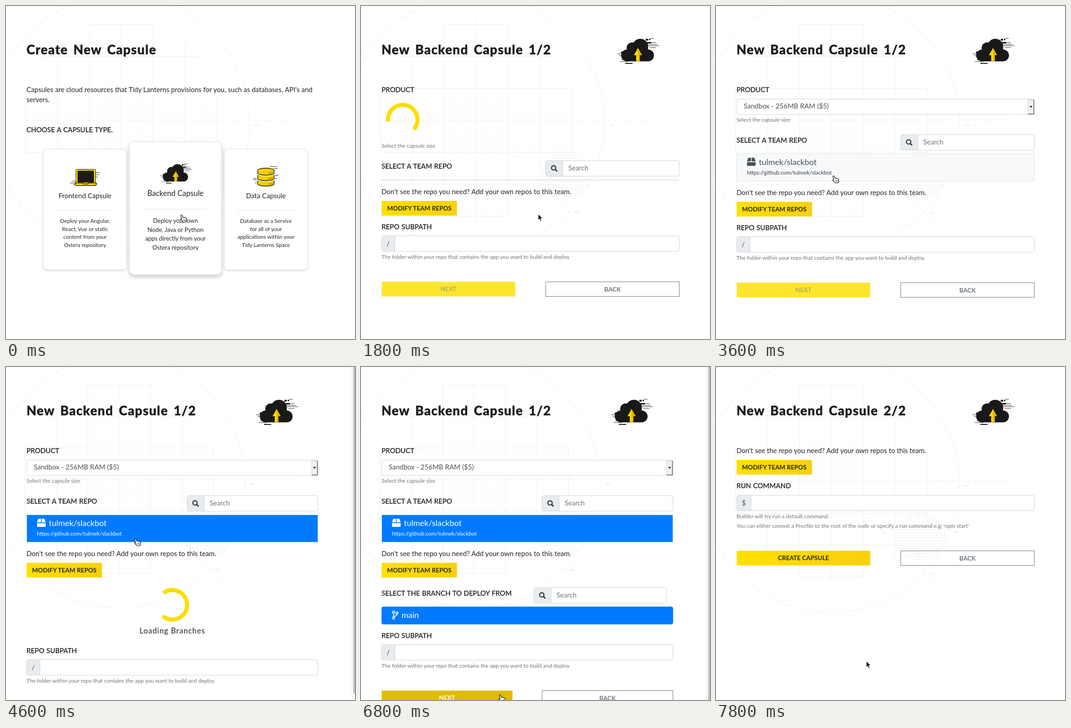
Animation, 766 px wide and 731 px high, one loop 8000 ms. Source, as an HTML page:

```html
<!DOCTYPE html>
<html lang="en">
<head>
<meta charset="utf-8">
<title>New capsule</title>
<style>
html, body { margin: 0; width: 100%; height: 100%; overflow: hidden; background: #fff; }
svg { display: block; }
text { font-family: Lato, "Open Sans", sans-serif; font-size: 15px; fill: #212529; word-spacing: .15px; white-space: pre; }
.label { font-weight: 500; stroke: #212529; stroke-width: .25px; word-spacing: .75px; }
.title { font-size: 28px; font-weight: 800; letter-spacing: 1.3px; word-spacing: 4px; fill: #1b1d20; stroke: #1b1d20; stroke-width: .5px; }
.small { font-size: 12px; word-spacing: 0; }
.hint { font-size: 12px; word-spacing: 0; fill: #6c757d; }
.grey { fill: #6c757d; }
.dark { fill: #495057; }
.btn { font-size: 13.5px; font-weight: 700; text-anchor: middle; }
.repo { font-size: 18px; word-spacing: 0; }
.load { font-size: 17px; letter-spacing: .8px; text-anchor: middle; }
.mid { text-anchor: middle; }
</style>
</head>
<body>
<svg width="766" height="731" viewBox="0 0 766 731">
<defs>
  <pattern id="fine" width="5" height="5" patternUnits="userSpaceOnUse"><circle cx="2" cy="2" r=".5" fill="#eef2f2"/></pattern>
  <pattern id="dots" width="6" height="6" patternUnits="userSpaceOnUse"><circle cx="3" cy="3" r=".75" fill="#c4c8ca"/></pattern>
  <linearGradient id="gold"><stop stop-color="#ffdf00"/><stop offset="1" stop-color="#fad00c"/></linearGradient>
  <filter id="flat" x="-20%" y="-20%" width="140%" height="140%">
    <feDropShadow dx="0" dy="1.5" stdDeviation="2" flood-opacity=".17"/>
  </filter>
  <filter id="lifted" x="-20%" y="-20%" width="140%" height="140%">
    <feDropShadow dx="0" dy="4" stdDeviation="4" flood-opacity=".22"/>
  </filter>
</defs>
<g id="stage"></g>
</svg>
<script>
const stage = document.getElementById('stage');
const YELLOW = '#ffdc00', BLUE = '#007bff', BLACK = '#191919', BORDER = '#ced4da';
const USER = 'tulmek';

const text = (x, y, s, cls = '', fill = '') =>
  `<text x="${x}" y="${y}" class="${cls}" ${fill && `style="fill:${fill}"`}>${s}</text>`;
const rect = (x, y, w, h, fill, stroke = 'none', r = 0) =>
  `<rect x="${x}" y="${y}" width="${w}" height="${h}" fill="${fill}" stroke="${stroke}" rx="${r}"/>`;
const path = (d, fill, stroke = 'none', width = 1) =>
  `<path d="${d}" fill="${fill}" stroke="${stroke}" stroke-width="${width}"/>`;
const circle = (x, y, r, fill, stroke = 'none', width = 1) =>
  `<circle cx="${x}" cy="${y}" r="${r}" fill="${fill}" stroke="${stroke}" stroke-width="${width}"/>`;
const group = (x, y, s, body) => `<g transform="translate(${x} ${y}) scale(${s})">${body}</g>`;

// Backdrop
const tag = (x, y) => `<text x="${x}" y="${y}" style="font-size:7px;fill:#c3c8ca" class="mid">&lt;/&gt;</text>`;
const backdrop =
  '<circle cx="252" cy="257" r="282" fill="none" stroke="#e8ecec" stroke-dasharray="14 9"/>' +
  rect(183, 40.5, 140, 421, 'url(#fine)', '#eaf0f0') +
  rect(42.5, 181, 421, 140, 'url(#fine)', '#eaf0f0') +
  path('M252.5 30V473M113 80V420M393 80V420M33 250.5H470M82 110.5H423M82 391H423', 'none', '#edf2f2') +
  '<path d="M470 250.5H650M300 295L484 481" fill="none" stroke="#e6eaea" stroke-dasharray="7 5"/>' +
  circle(451, 372, 54, 'url(#dots)') +
  tag(550, 264) + tag(472, 456) + tag(528, 364);

// Icons, each around its own centre
const cloud =
  circle(-23, 11.5, 13, BLACK) + circle(-12, -5, 12, BLACK) + circle(6, -7.5, 17.5, BLACK) +
  circle(23, 11.5, 13, BLACK) + rect(-23, -5, 46, 29.5, BLACK, 'none', 3) +
  path('M18-25h5v4h-5zM25-25h3v3h-3zM21-18h9v3h-9zM-27 28h16v2h-16zM-36 3h10v4h-10z', BLACK) +
  path('M20-17H40M24-10H48M22-13H43M27-6H40M-44 8H-30M-41 12H-28M-39 25H-20M-37 5H-28M-35 21H-22M28-26H36', 'none', BLACK, .9) +
  path('M1-5L-8 11H-3V24H1Z', YELLOW) + path('M1-5L10 11H5V24H1Z', '#e2b600');

const laptop =
  path('M-29 9H-18M-34 13H-20M-27 17H-20M22-10H32M20-5H30M22 0H27', 'none', BLACK, .9) +
  rect(-21, -17, 43, 32, YELLOW, '#111', 2) +
  rect(-17, -13.5, 35, 25, '#1c1c1c', '#111', 1) +
  path('M-23 13H-6L-4 15H5L7 13H24V16Q23 18.5 20 18.5H-19Q-22 18.5-23 16Z', YELLOW, '#111', 1.4);

const disc = y => {
  const d = `M-18 ${y}a18 4.5 0 0 1 36 0v6a18 5 0 0 1-36 0z`;
  return path(d, '#fff', '#fff', 4.5) + path(d, '#f3cf00', '#111', 1.4) +
    path(`M4 ${y + 4.4}Q14 ${y + 3.5} 17.3 ${y + 1}V${y + 6}Q13 ${y + 9.5} 4 ${y + 10.2}Z`, '#d6ab00');
};
const database =
  path('M8-24H25M16-20H26M-29 2H-18M-27 5H-20M-24 12H-19M20-5H28M19 2H24', 'none', BLACK, .9) +
  [8, -4, -16].map(disc).join('');

const lens = (x, y) => circle(x - 1.2, y - 1.2, 4.8, 'none', '#343a40', 2.4) +
  path(`M${x + 2.6} ${y + 2.6}L${x + 6.4} ${y + 6.4}`, 'none', '#343a40', 3);
const parcel = (y, fill) =>
  group(68, y, 1, path('M4 0H8.7V8H0L2.4 1.2Q2.8 0 4 0ZM10.3 0H15Q16.2 0 16.6 1.2L19 8H10.3ZM0 9.7H19V16Q19 18 17 18H2Q0 18 0 16Z', fill));
const fork = (y, c) => path(`M71.5 ${y - 4}V${y + 4}M79 ${y - 2}Q79 ${y + 2} 72 ${y + 3}`, 'none', c, 1.8) +
  [[71.5, -6.5], [71.5, 6.5], [79, -4.5]].map(([x, dy]) => circle(x, y + dy, 2.3, 'none', c, 1.8)).join('');

// Form parts
const input = (x, y, w, addon, sign) =>
  rect(x + .5, y + .5, w - 1, 34, '#fff', BORDER, 3.5) +
  path(`M${x + addon} ${y + 1}H${x + 4}Q${x + 1} ${y + 1} ${x + 1} ${y + 4}V${y + 31}Q${x + 1} ${y + 34} ${x + 4} ${y + 34}H${x + addon}Z`, '#e9ecef') +
  path(`M${x + addon} ${y}V${y + 34}`, 'none', BORDER) +
  (sign ? text(x + addon / 2, y + 22.5, sign, 'mid dark') : '');
const search = (x, y, w) => input(x, y, w, 38) + lens(x + 19, y + 17.5) + text(x + 50, y + 22, 'Search', 'grey');
const button = (x, y, w, s, fill, color) =>
  rect(x + .4, y + .4, w - .8, 32.2, fill) + text(x + w / 2, y + 21, s, 'btn', color);
const backButton = (x, y, w) =>
  rect(x + .5, y + .5, w - 1, 32, 'none', '#6c757d') + text(x + w / 2, y + 21.5, 'BACK', 'btn grey');
const addRepos = y => text(45, y, "Don't see the repo you need? Add your own repos to this team.") +
  button(45, y + 14.5, 166, 'MODIFY TEAM REPOS', 'url(#gold)', '#212529');
const spinner = (x, y, start, sweep) => {
  const at = deg => {
    const a = deg * Math.PI / 180;
    return `${x + 32.5 * Math.cos(a)} ${y + 32.5 * Math.sin(a)}`;
  };
  return path(`M${at(start)}A32.5 32.5 0 ${sweep > 180 ? 1 : 0} 1 ${at(start + sweep)}`, 'none', YELLOW, 9);
};

// Pages
const card = (x, y, s, icon, name, lines) => group(x, y, s,
  `<g filter="url(#${s > 1 ? 'lifted' : 'flat'})">${rect(-91.5, -132.5, 183, 265, '#fff', '#dde1e4', 8)}</g>` +
  icon + text(0, -25, name, 'mid') + path('M-62 2H62', 'none', '#dcdfe2') +
  lines.map((l, i) => text(0, 29.3 + 17.7 * i, l, 'mid small')).join(''));

const choosePage = () => backdrop +
  text(45, 106, 'Create New Capsule', 'title') +
  text(45, 189, "Capsules are cloud resources that Tidy Lanterns provisions for you, such as databases, API's and") +
  text(45, 211, 'servers.') +
  text(45, 277, 'CHOOSE A CAPSULE TYPE.', 'label') +
  card(173.5, 446.5, 1, group(1, -71, 1, laptop), 'Frontend Capsule',
    ['Deploy your Angular,', 'React, Vue or static', 'content from your', 'Ostera repository']) +
  card(570.5, 446.5, 1, group(0, -70, 1, database), 'Data Capsule',
    ['Database as a Service', 'for all of your', 'applications within your', 'Tidy Lanterns Space']) +
  card(372, 444, 1.1, group(0, -70.5, .7, cloud), 'Backend Capsule',
    ['Deploy your own', 'Node, Java or Python', 'apps directly from your', 'Ostera repository']);

function formPage(t) {
  const repos = t >= 2000, ready = t >= 3000, hover = t >= 3600, picked = t >= 3800;
  const branches = t >= 4800, chosen = t >= 5600, onNext = t >= 6600;
  const right = picked ? 685 : 699, half = picked ? 288 : 294, col = right - half, wide = right - 45;
  const top = ready ? 0 : 57, mid = top - (repos ? 0 : 59);
  const low = mid + (branches ? 103 : picked ? 136 : 0);
  let s = group(0, 0, picked ? .9825 : 1, backdrop) +
    text(45, 106, 'New Backend Capsule 1/2', 'title') +
    group(picked ? 593 : 607, 97, 1, cloud) + text(45, 189, 'PRODUCT', 'label');

  if (ready) {
    const x = right - 14;
    s += rect(45.5, 204.5, wide - 1, 33.5, '#fff', BORDER, 3.5) +
      text(61, 225, 'Sandbox - 256MB RAM ($5)', 'dark') +
      rect(x, 205.5, 13, 32, '#f1f2f3', '#c9cccf') +
      path(`M${x} 237H${right - 1.5}V206`, 'none', '#7d8286', 2) +
      path(`M${x + 3} 219.5h6.5l-3.2 3.8z`, '#111');
  } else {
    s += spinner(91.5, 249.5, -131 + (t - 1200) * 811 / 1600, 251 - 60 * Math.cos((t - 1200) * Math.PI / 1600));
  }

  s += text(45, 254 + top, 'Select the capsule size', 'hint') +
    text(45, 300 + top, 'SELECT A TEAM REPO', 'label') + search(col, 282 + top, half);

  if (repos) {
    const y = 324 + top, ink = picked ? '#fff' : '';
    s += rect(45.5, y + .5, wide - 1, 60, picked ? BLUE : hover ? '#f8f9fa' : '#fff', picked ? '#cfe3fb' : '#dfe2e5') +
      parcel(y + 9, ink || '#495057') +
      text(94, y + 25, USER + '/slackbot', 'repo dark', ink) +
      text(68, y + 46, `https://github.com/${USER}/slackbot`, 'small', ink || '#343a40');
  } else {
    s += rect(45, 324 + top, wide, 2, '#dee2e6');
  }
  s += addRepos(415 + mid);

  if (branches) {
    const ink = chosen ? '#fff' : '#495057';
    s += text(45, 502, 'SELECT THE BRANCH TO DEPLOY FROM', 'label') + search(379, 484, 292) +
      rect(45.5, 526.5, wide - 1, 38, chosen ? BLUE : '#fff', chosen ? BLUE : '#dfe2e5', 3.5) +
      fork(544.5, ink) + text(89, 551, 'main', 'repo', ink);
  } else if (picked) {
    s += spinner(365, 522, -127 + (t - 4600) * .507, 257 + 60 * Math.sin((t - 4600) * Math.PI / 1600)) +
      text(365, 585, 'Loading Branches', 'load');
  }

  s += text(45, 492 + low, 'REPO SUBPATH', 'label') + input(45, 506 + low, wide, 29.5, '/') +
    text(45, 557 + low, 'The folder within your repo that contains the app you want to build and deploy', 'hint') +
    button(45, 607 + low, half, 'NEXT', onNext ? '#dfbc00' : chosen ? YELLOW : '#fee62c',
      onNext ? '#fff' : chosen ? '#212529' : '#b5ab5c') +
    backButton(col, 607 + low, half);

  if (picked) {
    s += path('M759.5 0V731', 'none', '#e6e6e6') + rect(762, -8, 8, branches ? 760 : 725, '#c1c1c1', 'none', 4);
  }
  return s;
}

const runPage = () => backdrop +
  text(45, 106, 'New Backend Capsule 2/2', 'title') + group(607, 97, 1, cloud) +
  addRepos(189) + text(45, 266, 'RUN COMMAND', 'label') + input(45, 281, 654, 32, '$') +
  text(45, 332, 'Builder will try run a default command.', 'hint') +
  text(45, 353, "You can either commit a Procfile to the root of the code or specify a run command e.g: 'npm start'", 'hint') +
  button(45, 403, 294, 'CREATE CAPSULE', 'url(#gold)', '#212529') + backButton(405, 403, 294);

// Pointer
const arrow = path('M0 0V13L3 10.3L5.2 15.2L7.4 14.2L5.3 9.5H9.3Z', '#000', '#fff', .9);
const hand = path('M-3.5 1.5Q-2.5-1.2-.5 .5L1 5Q3 4 4 5.5Q6 4.8 6.8 6.3Q9 6 9.2 8L9.5 12L8 15.5H1.5Q0 12.5-3.8 10Q-4.5 8-1.5 8.6Z', '#fff', '#111', 1.2) +
  path('M3 9.5V13M5 9.5V13M7 9.5V13', 'none', '#111', .8);
const route = [[0, 387, 459], [600, 387, 459], [800, 389, 457], [1800, 389, 457], [2800, 371, 233], [3000, 371, 233],
  [3600, 260, 373], [3800, 260, 373], [4600, 286, 377], [4800, 286, 377], [5400, 190, 546], [5800, 190, 546],
  [6600, 307, 720], [7000, 307, 720], [7800, 330, 646], [8000, 330, 646]];

function pointer(t) {
  const i = route.findIndex(k => k[0] > t);
  const [t0, x0, y0] = route[i - 1], [t1, x1, y1] = route[i];
  const u = (t - t0) / (t1 - t0), e = u * u * (3 - 2 * u);
  const onLink = t < 800 || t >= 3600 && t < 5000 || t >= 5400 && t < 6000 || t >= 6600 && t < 7000;
  const ring = t >= 600 && t <= 1200 ? circle(388, 457, 23, '#ffffff80', '#8fb9f5', 2.6) : '';
  return ring + group(x0 + (x1 - x0) * e, y0 + (y1 - y0) * e, 1, onLink ? hand : arrow);
}

// The screen refreshes five times a second
let shown = -1;
function draw() {
  const t = Math.floor(performance.now() % 8000 / 200) * 200;
  if (t !== shown) {
    shown = t;
    stage.innerHTML = (t < 800 ? choosePage() : t < 7000 ? formPage(t) : runPage()) + pointer(t);
  }
  requestAnimationFrame(draw);
}
draw();
</script>
</body>
</html>
```
